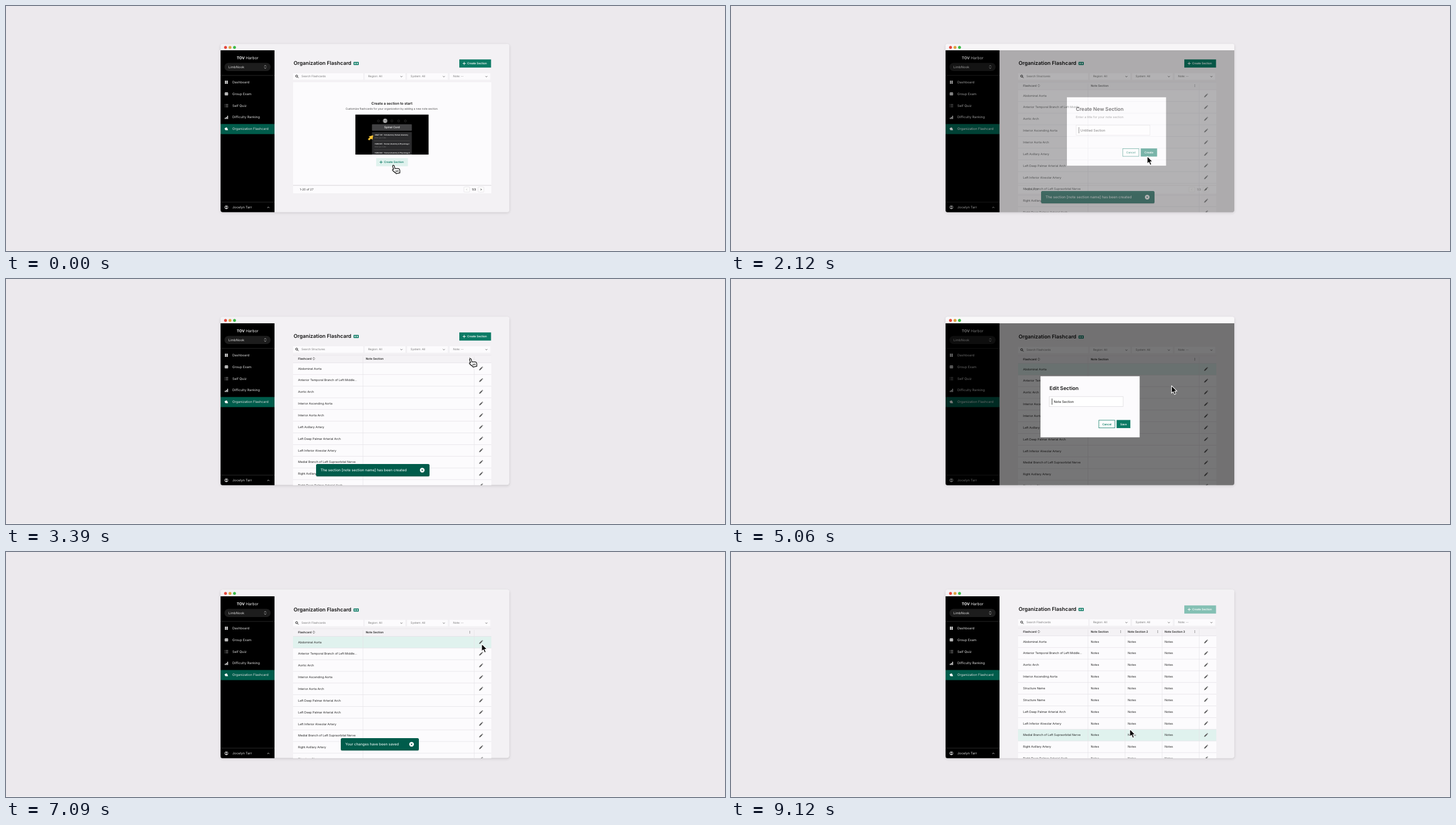
These frames come from a looping animation (1280x437 px, 9150 ms). An HTML page:

```html
<!DOCTYPE html>
<html lang="en">
<head>
<meta charset="utf-8">
<title>Flashcard sections</title>
<style>
html, body { margin: 0; width: 100%; height: 100%; overflow: hidden; background: #ece9ed; }
svg { display: block; width: 1280px; height: 437px; }
text { font-family: Inter, "Open Sans", sans-serif; text-rendering: geometricPrecision; white-space: pre; }
</style>
</head>
<body>
<svg id="stage" viewBox="0 0 1280 437" xmlns="http://www.w3.org/2000/svg"></svg>
<script>
const GREEN = '#0b7a64', DEEP = '#005c4b', MINT = '#e0f2ee';
const INK = '#111', PAGE = '#f3f1f4', CARD = '#fcfbfd', LINE = '#e5e2e7';

// Shape helpers
const rect = (x, y, w, h, fill, more = '') =>
  `<rect x="${x}" y="${y}" width="${w}" height="${h}" fill="${fill}" ${more}/>`;
const text = (x, y, s, size, fill = INK, weight = 400, anchor = 'start') =>
  `<text x="${x}" y="${y}" font-size="${size}" fill="${fill}" font-weight="${weight}" text-anchor="${anchor}">${s}</text>`;
const stroke = (d, color, w = 1, more = '') =>
  `<path d="${d}" fill="none" stroke="${color}" stroke-width="${w}" ${more}/>`;
const fillPath = (d, fill) => `<path d="${d}" fill="${fill}"/>`;
const circle = (x, y, r, fill, more = '') => `<circle cx="${x}" cy="${y}" r="${r}" fill="${fill}" ${more}/>`;
const group = (s, more = '') => `<g ${more}>${s}</g>`;
const shift = (dy, s) => group(s, `transform="translate(0 ${dy})"`);
const chevron = (x, y, color = '#555', up = 1) =>
  stroke(`M${x - 1.8} ${y - .9 * up}l1.8 1.8 1.8-1.8`.replace(/1\.8 1\.8 1\.8-1\.8/, `1.8 ${1.8 * up} 1.8 ${-1.8 * up}`), color, .8);

function sidebar() {
  const labels = ['Dashboard', 'Group Exam', 'Self Quiz', 'Difficulty Ranking', 'Organization Flashcard'];
  const grey = '#dcdcdc';
  return rect(382, 79, 96, 290, '#000') +
    `<text x="430" y="95.4" font-size="6.8" fill="#f4f4f4" text-anchor="middle"><tspan font-weight="700">TOV</tspan> Harbor</text>` +
    rect(389, 101.5, 82, 14.5, '#1d1d1d', 'rx="7"') + text(396, 110.6, 'LimbNook', 5.9, grey) +
    chevron(461.5, 106.8, grey, -1) + chevron(461.5, 110.6, grey) +
    rect(382, 123.5, 96, .8, '#333') + rect(382, 210.5, 96, 18, DEEP) + rect(382, 349.5, 96, .8, '#333') +
    labels.map((s, i) => text(403, 137.9 + i * 20.85, s, 5.9, grey)).join('') +
    // menu icons
    [0, 1, 2, 3].map(i => rect(389.7 + i % 2 * 2.9, 133.3 + (i >> 1) * 2.9, 2.4, 2.4, '#eee')).join('') +
    rect(389.5, 154.3, 5.8, 5, '#eee', 'rx=".6"') + rect(390.7, 156, 1.2, 1.6, '#222') + rect(393, 156, 1.2, 1.6, '#222') +
    stroke('M391.3 175.5h4.2M391.3 177.7h4.2M391.3 179.9h4.2M389.3 175.5h1M389.3 177.7h1M389.3 179.9h1', '#bbb', .7) +
    stroke('M390.3 201.5v-2M392.4 201.5v-3.5M394.5 201.5v-5.8', '#eee', 1.5) +
    fillPath('M390 217.5l3-1 1.3 2 1 3h-4.6l-1.6-2.4z', '#fff') +
    circle(392.3, 359, 2.9, 'none', 'stroke="#eee" stroke-width=".8"') + circle(392.3, 358.2, 1.1, '#eee') +
    fillPath('M390.2 361q2.1-2.2 4.2 0q-2.1 1.6-4.2 0', '#eee') +
    text(403, 361, 'Jocelyn Tarr', 5.9, grey) + chevron(467, 359.3, '#eee', -1);
}

const addButton = (x, y, bg, ink) => rect(x, y, 56.5, 14.5, bg) +
  stroke(`M${x + 6} ${y + 7.2}h5.4m-2.7-2.7v5.4`, ink, .9) + text(x + 14, y + 9, 'Create Section', 4.9, ink, 600);

function header(search, button) {
  const filter = (x, s) => rect(x, 120, 72.5, 11.5, CARD) + text(x + 6.2, 127.4, s, 5, '#777') + chevron(x + 65.5, 125.8);
  return text(512, 105.3, 'Organization Flashcard', 9.2, INK, 600) +
    rect(618.7, 99.8, 9.3, 5.4, GREEN, 'rx=".6"') + rect(620.4, 101.4, 2.2, 2.2, '#fff') + rect(624.2, 101.4, 2.2, 2.2, '#fff') +
    (button ? addButton(807, 95.3, button, '#fff') : '') +
    rect(511, 120, 125, 11.5, CARD) + circle(517.4, 125, 1.8, 'none', `stroke="${INK}" stroke-width=".9"`) +
    stroke('M518.7 126.3l2 2', INK, 1) + text(526, 127.4, search, 4.95, '#777') +
    filter(638.5, 'Region: All') + filter(714, 'System: All') + filter(789.7, 'Note: --');
}

function emptyPanel(content) {
  const pageButton = (x, d, c) => rect(x, 322.8, 10.2, 9, '#fff', 'stroke="#dedbe0" stroke-width=".7" rx="1"') + stroke(d, c, .9);
  return rect(511, 136, 353, 198, CARD) + content + rect(511, 319.3, 353, 1.2, '#dddade') +
    text(523, 329, '1-20 of 27', 5.1, '#333') + text(833, 329, '1/3', 5, INK, 500, 'middle') +
    pageButton(815.3, 'M821 325.8l-1.5 1.5 1.5 1.5', '#bbb') + pageButton(840.5, 'M845 325.8l1.5 1.5-1.5 1.5', INK);
}

function startCard() {
  const courses = ['ANAT 101 - Introductory Human Anatomy', 'HUM 205 - Human Anatomy &amp; Physiology I', 'HUM 206 - Human Anatomy &amp; Physiology II'];
  return text(687, 176.2, 'Create a section to start', 6.3, INK, 600, 'middle') +
    text(687, 185.3, 'Customize flashcards for your organization by adding a new note section.', 4.75, '#444', 400, 'middle') +
    rect(622, 193.7, 130.3, 71.3, '#000') +
    [663, 687, 699, 711].map(x => circle(x, 205, 1.8, 'none', 'stroke="#333" stroke-width=".8"')).join('') +
    circle(675, 204.8, 4.3, '#777') + rect(673.4, 202.6, 3.2, 4.4, 'none', 'stroke="#fff" stroke-width=".7"') +
    rect(651.5, 211, 71, 11.5, '#414143', 'rx="1"') + text(687, 218.3, 'Spinal Cord', 5, '#fff', 500, 'middle') +
    rect(651.5, 225, 71, 40, '#2b2b2d') +
    courses.map((s, i) => text(656.5, 231 + i * 16, s, 3, '#fff', 600) +
      (i < 2 ? text(656.5, 235.5 + i * 16, 'Enter your notes', 2.6, '#888') + rect(655, 240 + i * 16, 64, .5, '#555') : '')).join('') +
    fillPath('M653.8 230.5l-1.5 8-2.2-1.8-3.8 3-2-2.4 3.6-3-2.4-1.6z', '#f7c234') +
    addButton(659, 271.3, MINT, GREEN);
}

const ARCH = 'Left Deep Palmar Arterial Arch';
const NAMES = ['Abdominal Aorta', 'Anterior Temporal Branch of Left Middle...', 'Aortic Arch', 'Interior Ascending Aorta',
  'Interior Aorta Arch', 'Left Axillary Artery', ARCH, 'Left Inferior Alveolar Artery',
  'Medial Branch of Left Supraorbital Nerve', 'Right Axillary Artery', 'Right Deep Palmar Arterial Arch'];
const names = changes => Object.assign([...NAMES], changes);

function table(rows, active, columns) {
  const top = 149.4, pitch = 20.85;
  const edges = columns.length > 1 ? [635, 701, 767, 833] : [635, 833];
  const dots = x => [-1.8, 0, 1.8].map(d => circle(x, 142 + d, .55, '#444')).join('');
  let s = rect(511, 136, 353, 13.4, '#f4f2f5') + rect(511, top, 353, 230, CARD) + rect(511, 135.6, 353, .7, LINE);
  rows.forEach((name, i) => {
    const y = top + i * pitch, base = y + 12.2;
    if (i === active) s += rect(511, y, 353, pitch, MINT);
    s += rect(511, y - .4, 353, .8, LINE) + text(520, base, name, 5.3, '#222');
    if (columns.length > 1) s += columns.map((c, n) => text(640.5 + n * 65.8, base, 'Notes', 5.3, '#222')).join('');
    s += group(fillPath('M-3 3l.5-2 3.9-3.9 1.5 1.5-3.9 3.9zM1.9-3.4l.7-.7 1.5 1.5-.7.7z', '#5d5d5d'),
      `transform="translate(845.3 ${y + 10.6})"`);
  });
  s += edges.map(x => rect(x, 138, .7, 230, LINE)).join('');
  s += text(520, 143.8, 'Flashcard', 5, '#222', 600) + chevron(548, 140.7, '#444', -1) + chevron(548, 143.4, '#444');
  return s + columns.map((c, n) =>
    text(640.5 + n * 65.8, 143.8, c, 5.1, '#222', 600) + dots(edges[n + 1] - 7.3)).join('');
}

const toast = (x, y, w, s) => rect(x, y + 1.5, w, 22, '#000', 'rx="2.5" opacity=".12"') + rect(x, y, w, 22, DEEP, 'rx="2.5"') +
  text(x + 8, y + 13, s, 6.4, '#e6f3f0', 500) + circle(x + w - 13, y + 11, 4.2, '#fff') +
  stroke(`M${x + w - 14.5} ${y + 9.5}l3 3m0-3l-3 3`, DEEP, .9);

const button = (x, y, w, s, solid) =>
  rect(x + .4, y + .4, w - .8, 13.7, solid ? GREEN : '#fff', `stroke="${GREEN}" stroke-width=".8"`) +
  text(x + w / 2, y + 9, s, 4.9, solid ? '#fff' : GREEN, 600, 'middle');
const field = (x, y, s) => rect(x, y, 131.5, 17.7, '#fff', 'stroke="#dcdade" stroke-width=".8"') +
  rect(x + 4.6, y + 3.4, .8, 11, INK) + text(x + 7.8, y + 10.8, s, 5.9);
const DIM = rect(382, 79, 514, 290, '#000', 'opacity=".53"');

const createDialog = DIM + rect(598, 162.8, 176.5, 122, CARD) + text(614, 187.2, 'Create New Section', 8.9, INK, 600) +
  text(614, 200.3, 'Enter a title for your note section', 5.5, '#666') + field(614.3, 212.7, 'Untitled Section') +
  button(697, 254, 29.5, 'Cancel') + button(729.5, 254, 29, 'Create', true);
const editDialog = DIM + rect(551, 173.4, 176.5, 109, CARD) + text(567, 197.7, 'Edit Section', 9, INK, 600) +
  field(566.6, 209.8, 'Note Section') + button(654.5, 251.5, 29.2, 'Cancel') + button(686.5, 251.5, 24.5, 'Save', true);

const page = s => rect(382, 67.5, 514, 301, PAGE) +
  ['#e5473c', '#dfa23f', '#3dbb48'].map((c, i) => circle(390.8 + i * 8, 73.8, 2.6, c)).join('') + s + '';
const shell = (content, over = '') =>
  page((over ? rect(382, 67.5, 514, 11.5, '#fff', 'opacity=".5"') +
    ['#e5473c', '#dfa23f', '#3dbb48'].map((c, i) => circle(390.8 + i * 8, 73.8, 2.6, c)).join('') : '') +
    '<use href="#side"/>' + content + over);

const CARDS = 'Search Flashcards', FIRST = ['Note Section'];
const edited = rows => shift(1, header(CARDS) + table(rows, 0, FIRST));
// Each screen dissolves over the one before: start, duration, markup
const screens = [
  [0, 0, shell(header(CARDS, GREEN) + emptyPanel(startCard()))],
  [760, 240, shell(header(CARDS, GREEN) + emptyPanel(''), createDialog)],
  [2060, 200, shell(header('Search Structures', GREEN) + table(NAMES, -1, FIRST) +
    toast(552, 330, 202, 'The section [note section name] has been created'))],
  [4640, 90, shell(edited(names({ 10: 'Structure Name' })), editDialog)],
  [5970, 170, shell(edited(names({ 5: ARCH, 10: 'Structure Name' })) + toast(596, 332, 139, 'Your changes have been saved'))],
  [7450, 310, shell(header(CARDS, '#84c0b4') +
    table(names({ 4: 'Structure Name', 5: 'Structure Name' }), 8, ['Note Section', 'Note Section 2', 'Note Section 3']))]
];

const HAND = 'M0 2q0-2 1.6-2t1.6 2v4.5l6.3 1.3q2 .5 2 2.5v2.2q0 1.3-.7 2.5v1.5h-7.5v-1.5q-2.8-2.2-4.7-5.6q-.9-1.8.6-2.4q.8-.2 1.4.8z';
const ARROW = 'M0 0v12.8l2.9-2.6 2 4.7 2.3-1-2-4.6h4z';

document.getElementById('stage').innerHTML =
  `<defs><clipPath id="frame">${rect(382, 67.5, 514, 300.3, '#000', 'rx="4"')}</clipPath>
  <filter id="soft" x="-10%" y="-10%" width="120%" height="120%"><feGaussianBlur stdDeviation="2.5"/></filter>
  <g id="side">${sidebar()}</g></defs>` +
  rect(0, 0, 1280, 437, '#ece9ed') + rect(0, 436, 1280, 1, '#f6f5f6') +
  rect(382, 69, 514, 300, '#000', 'rx="4" opacity=".13" filter="url(#soft)"') +
  group(screens.map(s => group(s[2], 'class="screen"')).join(''), 'clip-path="url(#frame)"') +
  group(
    group(`<path d="${HAND}" fill="#fff" stroke="#111" stroke-width="1.3" stroke-linejoin="round"/>` +
      stroke('M4.2 10.3v3.4M6.3 10.5v3.2M8.4 10.7v3', '#111', .9),
      'id="hand" transform="rotate(-12) scale(.95)"') +
    group(`<path d="${ARROW}" fill="#000" stroke="#fff" stroke-width="1" stroke-linejoin="round"/>`, 'id="arrow" transform="scale(1.05)"'),
    'id="cursor"');

// Pointer moves: start, end, target x, target y
const moves = [
  [1240, 1440, 741, 268], [2250, 3000, 825, 142.5], [3940, 4360, 826, 159],
  [4940, 5640, 694, 258], [6360, 7270, 853, 160], [7940, 8850, 710, 316]
];
const handTimes = [[0, 760], [1380, 2060], [2960, 4940], [5480, 5970]];
const clamp = v => Math.max(0, Math.min(1, v));
const layers = [...document.querySelectorAll('.screen')];
const [cursor, hand, arrow] = ['cursor', 'hand', 'arrow'].map(id => document.getElementById(id));

function draw(t) {
  screens.forEach(([start, length], i) => {
    const shown = t < start ? 0 : length ? clamp((t - start + 30) / length) : 1;
    layers[i].setAttribute('opacity', shown);
    layers[i].setAttribute('display', shown ? 'inline' : 'none');
  });
  let x = 688, y = 284.5;
  for (const [start, end, toX, toY] of moves) {
    const p = 1 - (1 - clamp((t - start) / (end - start))) ** 2;
    x += (toX - x) * p;
    y += (toY - y) * p;
  }
  cursor.setAttribute('transform', `translate(${x} ${y})`);
  const pointing = handTimes.some(([a, b]) => t >= a && t < b);
  hand.setAttribute('display', pointing ? 'inline' : 'none');
  arrow.setAttribute('display', pointing ? 'none' : 'inline');
}

const begin = performance.now();
function tick() {
  draw((performance.now() - begin) % 9150);
  requestAnimationFrame(tick);
}
draw(0);
requestAnimationFrame(tick);
</script>
</body>
</html>
```
